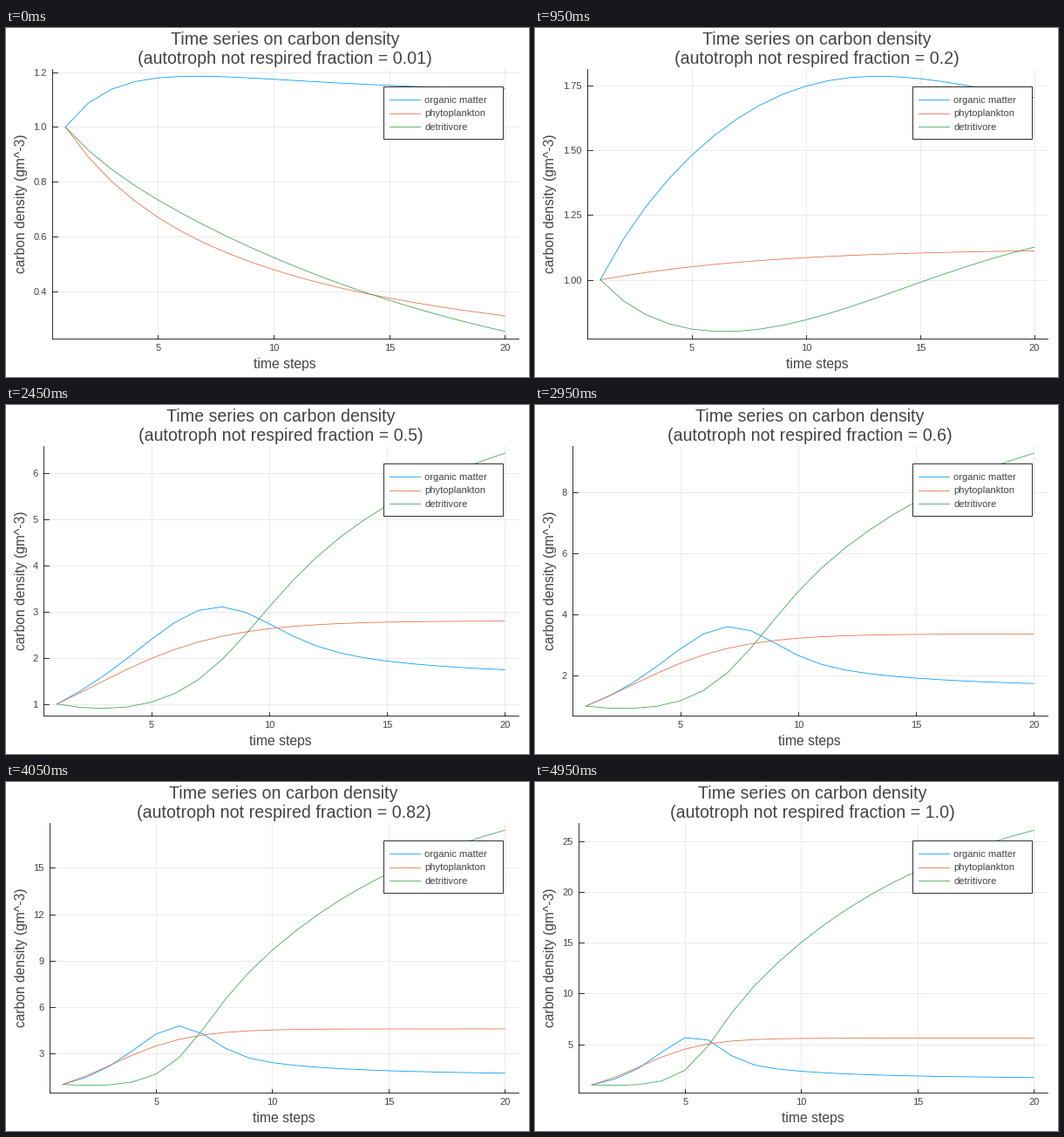
Animation, 600 px wide and 400 px high, one loop 5000 ms. Source, as a matplotlib script:

```python
import math

import matplotlib.pyplot as plt
import numpy as np
from matplotlib.animation import FuncAnimation
from matplotlib.patches import Rectangle

plt.rcParams["font.family"] = "Liberation Sans"

W, H, DPI = 600, 400, 100
PX = 72 / DPI
FRAMES, INTERVAL = 100, 50

TOP, BOTTOM, RIGHT = 46, 356, 588
AXIS_Y = 355.5
PAD = 0.03
STEPS = np.arange(1, 21)

INK, GRID = "#444444", "#E6E6E6"
STROKE = 0.8
SERIES = [("organic matter", "#009AFA"),
          ("phytoplankton", "#E36F47"),
          ("detritivore", "#3EA44E")]

# Carbon flow rates
GROWTH, CROWDING, EXUDATION = 0.74, 0.74 / 5.6, 0.3118
UPTAKE, GAIN, DEATH = 0.2845, 0.1662, 0.2638


def flow(state, frac):
    matter, phyto, detri = state
    dying = CROWDING * phyto ** 2
    eaten = matter * detri
    return np.array([
        dying + EXUDATION * frac * phyto + DEATH * detri - UPTAKE * eaten,
        GROWTH * frac * phyto - dying,
        GAIN * eaten - DEATH * detri,
    ])


def simulate(frac, substeps=20):
    """Runge-Kutta run for every fraction at once: (step, series, fraction)."""
    h = 1 / substeps
    state = np.ones((3, len(frac)))
    out = [state]
    for _ in STEPS[1:]:
        for _ in range(substeps):
            k1 = flow(state, frac)
            k2 = flow(state + h / 2 * k1, frac)
            k3 = flow(state + h / 2 * k2, frac)
            k4 = flow(state + h * k3, frac)
            state = state + h / 6 * (k1 + 2 * k2 + 2 * k3 + k4)
        out.append(state)
    return np.array(out)


def nice_ticks(lo, hi):
    """Pick tick values and labels by count, coverage and roundness."""
    best, choice = -1, None
    for z in (1, 0, -1, -2):
        for q, nice in ((5, 0.9), (3, 0.2), (2.5, 0.5), (2, 0.7), (1, 1)):
            step = q * 10.0 ** z
            first, last = math.ceil(lo / step), math.floor(hi / step)
            n = last - first + 1
            if not 4 <= n <= 8:
                continue
            cover = 1.5 * (hi - lo) / ((n - 1) * step)
            score = (1 - abs(n - 5) / 5) / 4 + cover / 3 + nice / 4
            if score > best + 1e-9:
                best, choice = score, (step, first, last)
    step, first, last = choice
    digits = next(d for d in range(4)
                  if abs(step * 10 ** d - round(step * 10 ** d)) < 1e-9)
    values = [i * step for i in range(first, last + 1)]
    return values, [f"{v:.{digits}f}" for v in values]


def label_width(text):
    return sum(3 if ch == "." else 6.65 for ch in text)


FRACTIONS = np.arange(1, FRAMES + 1) / 100
DATA = simulate(FRACTIONS)

fig = plt.figure(figsize=(W / DPI, H / DPI), dpi=DPI, facecolor="white")
ax = fig.add_axes([0, 0, 1, 1])


def line(x, y, color="black", **kw):
    ax.plot(x, y, color=color, lw=STROKE * PX, **kw)


def text(x, y, s, size, ha="center", **kw):
    ax.text(x, y, s, fontsize=size * PX, ha=ha, va="baseline", color=INK, **kw)


def draw_legend():
    ax.add_patch(Rectangle((433.5, 66.5), 137, 60, facecolor="white",
                           edgecolor="black", lw=STROKE * PX, zorder=5))
    for i, (name, color) in enumerate(SERIES):
        y = 81.5 + 15.5 * i
        line([440, 475.5], [y, y], color, zorder=6)
        text(481, y + 3.7, name, 11.15, ha="left", zorder=6)


def draw(i):
    ax.clear()
    # Half a pixel of offset makes snapped lines land on the nearest pixel.
    ax.set_xlim(0.5, W + 0.5)
    ax.set_ylim(H - 0.5, -0.5)
    ax.axis("off")

    run = DATA[:, :, i]
    lo, hi = run.min(), run.max()
    margin = PAD * (hi - lo)
    lo, hi = lo - margin, hi + margin
    values, labels = nice_ticks(lo, hi)
    left = round(36.7 + max(map(label_width, labels))) + 0.5
    mid = (left + RIGHT) / 2 - 0.3

    def px(t):
        return left + (RIGHT - left) * ((t - 1) / 19 + PAD) / (1 + 2 * PAD)

    def py(v):
        return BOTTOM - (BOTTOM - TOP) * (v - lo) / (hi - lo)

    for t in (5, 10, 15, 20):
        x = px(t)
        line([x, x], [TOP, AXIS_Y], GRID, zorder=1)
        line([x, x], [AXIS_Y - 4, AXIS_Y], zorder=3)
        text(x + 0.3, 369.5, str(t), 11.15)
    for v, label in zip(values, labels):
        y = py(v)
        line([left, RIGHT], [y, y], GRID, zorder=1)
        line([left, left + 5.5], [y, y], zorder=3)
        text(left - 6.3, y + 4, label, 11.15, ha="right")
    line([left, left], [TOP, AXIS_Y], zorder=3)
    line([left, RIGHT], [AXIS_Y, AXIS_Y], zorder=3)

    for k, (_, color) in enumerate(SERIES):
        line(px(STEPS), py(run[:, k]), color, zorder=4)
    draw_legend()

    frac = round(float(FRACTIONS[i]), 2)
    text(mid, 18.3, "Time series on carbon density", 19.7)
    text(mid, 40.3, f"(autotroph not respired fraction = {frac})", 19.7)
    text(mid + 0.3, 389.5, "time steps", 15.7)
    text(22.8, 200.5, "carbon density (gm^-3)", 15.6,
         rotation=90, rotation_mode="anchor")
    return []


anim = FuncAnimation(fig, draw, frames=FRAMES, interval=INTERVAL,
                     repeat=True, repeat_delay=0, blit=False)
plt.show()
```
